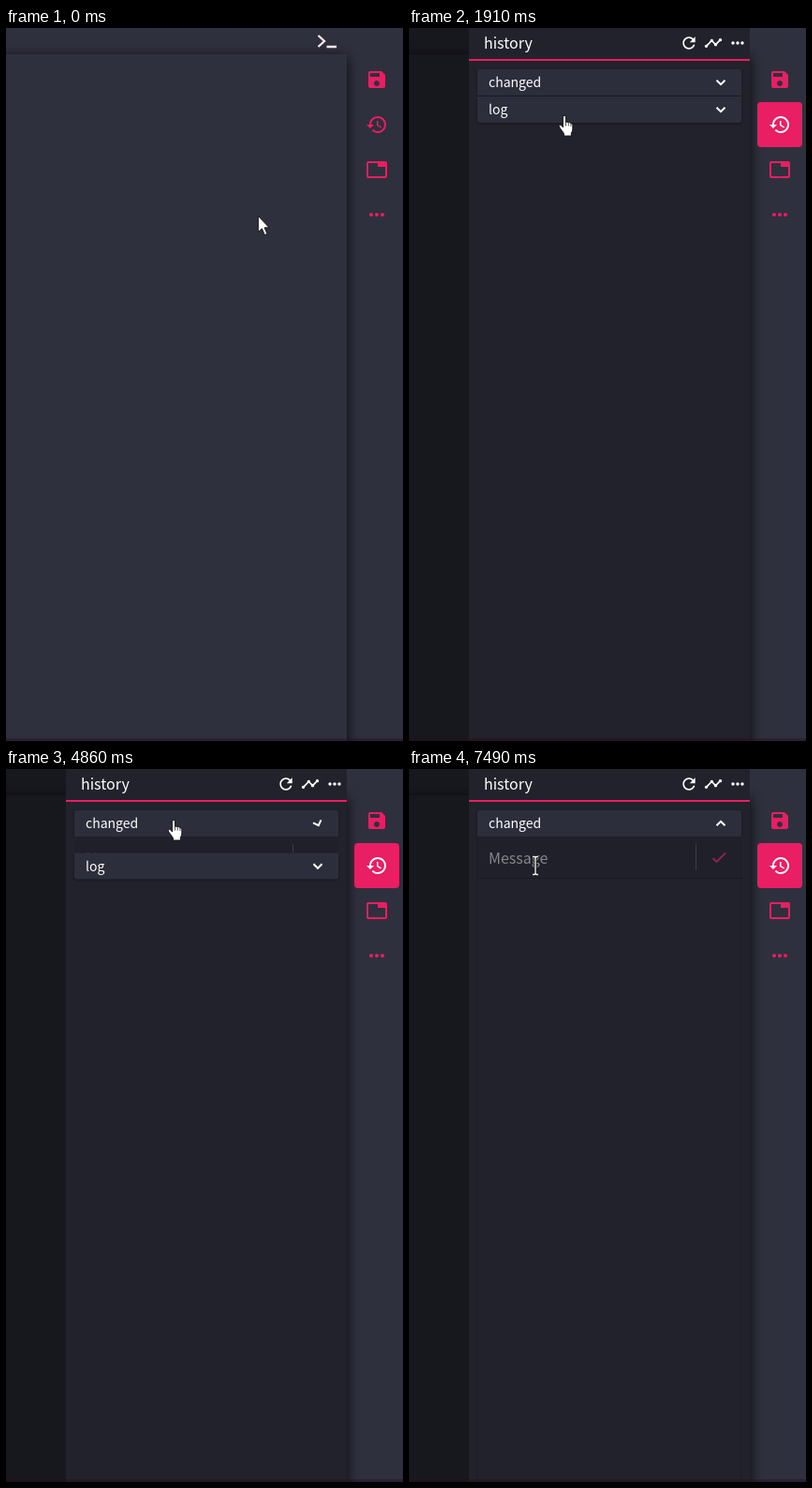
Animation, 424 px wide and 760 px high, one loop 8 s. Source, as an HTML page:

```html
<!DOCTYPE html>
<html lang="en">
<head>
<meta charset="utf-8">
<title>History panel</title>
<style>
html, body { margin: 0; width: 100%; height: 100%; overflow: hidden; background: #2f303d; }
svg { display: block; width: 424px; height: 760px; }
text { font: 500 16px "Noto Sans CJK KR", "Noto Sans CJK JP", "Noto Sans CJK SC", "Noto Sans CJK", "Noto Sans", sans-serif; fill: #fff; }
.row { font-size: 14px; }
.small { font-size: 12px; }
.thin { font-weight: 400; }
.chevron, .line { fill: none; stroke: #fff; stroke-width: 2; }
</style>
</head>
<body>
<svg viewBox="0 0 424 760">
  <defs>
    <filter id="blur" x="-20%" y="-20%" width="140%" height="140%"><feGaussianBlur stdDeviation="7"/></filter>
    <filter id="soft" x="-20%" y="-20%" width="140%" height="140%"><feGaussianBlur stdDeviation="1.5"/></filter>
    <clipPath id="changedClip"><rect id="changedMask" x="73" y="72" width="282" height="0"/></clipPath>
    <clipPath id="logClip"><rect id="logMask" x="73" y="101" width="282" height="0"/></clipPath>
    <path id="dots" d="M6 10c-1.1 0-2 .9-2 2s.9 2 2 2 2-.9 2-2-.9-2-2-2zm12 0c-1.1 0-2 .9-2 2s.9 2 2 2 2-.9 2-2-.9-2-2-2zm-6 0c-1.1 0-2 .9-2 2s.9 2 2 2 2-.9 2-2-.9-2-2-2z"/>
  </defs>

  <rect width="424" height="760" fill="#2f303d"/>
  <rect x="-40" y="31" width="404" height="780" opacity=".85" filter="url(#blur)"/>

  <g fill="#e91e63">
    <rect id="active" x="372" y="79" width="48" height="48" rx="4"/>
    <path transform="translate(384 43)" d="M17 3H5c-1.11 0-2 .9-2 2v14c0 1.1.89 2 2 2h14c1.1 0 2-.9 2-2V7l-4-4zm-5 16c-1.66 0-3-1.34-3-3s1.34-3 3-3 3 1.34 3 3-1.34 3-3 3zm3-10H5V5h10v4z"/>
    <path id="clock" transform="translate(384 91)" d="M13 3c-4.97 0-9 4.03-9 9H1l3.89 3.89.07.14L9 12H6c0-3.87 3.13-7 7-7s7 3.13 7 7-3.13 7-7 7c-1.93 0-3.68-.79-4.94-2.06l-1.42 1.42C8.27 19.99 10.51 21 13 21c4.97 0 9-4.03 9-9s-4.03-9-9-9zm-1 5v5l4.28 2.54.72-1.21-3.5-2.08V8H12z"/>
    <path transform="translate(384 139)" d="M21 3H3c-1.1 0-2 .9-2 2v14c0 1.1.9 2 2 2h18c1.1 0 2-.9 2-2V5c0-1.1-.9-2-2-2zm0 16H3V5h10v4h8v10z"/>
    <use href="#dots" x="384" y="187"/>
  </g>

  <rect y="28" width="364" height="732" fill="#2f303d"/>
  <path class="line" style="stroke:#fde6ee;stroke-width:2.3" d="M333.5 8l6.5 6-6.5 6M342.5 20H353"/>
  <rect id="shade" width="364" height="760"/>

  <g id="drawer">
    <rect x="64" width="300" height="760" fill="#22222c"/>
    <rect x="64" y="33" width="300" height="2" fill="#e91e63"/>
    <text x="80" y="22">history</text>
    <g fill="#fff">
      <path transform="translate(289 6) scale(.833)" d="M17.65 6.35C16.2 4.9 14.21 4 12 4c-4.42 0-7.99 3.58-7.99 8s3.57 8 7.99 8c3.73 0 6.84-2.55 7.73-6h-2.08c-.82 2.33-3.04 4-5.65 4-3.31 0-6-2.69-6-6s2.69-6 6-6c1.66 0 3.14.69 4.22 1.78L13 11h7V4l-2.35 2.35z"/>
      <path transform="translate(315 6) scale(.833)" d="M23 8c0 1.1-.9 2-2 2-.18 0-.35-.02-.51-.07l-3.56 3.55c.05.16.07.34.07.52 0 1.1-.9 2-2 2s-2-.9-2-2c0-.18.02-.36.07-.52l-2.55-2.55c-.16.05-.34.07-.52.07s-.36-.02-.52-.07l-4.55 4.56c.05.16.07.33.07.51 0 1.1-.9 2-2 2s-2-.9-2-2 .9-2 2-2c.18 0 .35.02.51.07l4.56-4.55C8.02 9.36 8 9.18 8 9c0-1.1.9-2 2-2s2 .9 2 2c0 .18-.02.36-.07.52l2.55 2.55c.16-.05.34-.07.52-.07s.36.02.52.07l3.55-3.56C19.02 8.35 19 8.18 19 8c0-1.1.9-2 2-2s2 .9 2 2z"/>
      <use href="#dots" transform="translate(341 6) scale(.833)"/>
    </g>

    <path id="sides" d="M73 72V760M355 72V760" stroke="#1d1d26"/>
    <rect x="73" y="45" width="282" height="28" rx="3" filter="url(#soft)" opacity=".4"/>
    <path d="M73 72V47q0-3 3-3H352q3 0 3 3V72z" fill="#2d2e3b"/>
    <text class="row" x="85" y="63">changed</text>
    <path class="chevron" id="changedArrow" d="M-4.5-2.3L0 2.2 4.5-2.3"/>

    <g clip-path="url(#changedClip)">
      <rect x="73" y="72" width="282" height="44" fill="#20202a"/>
      <path d="M73 116.5H355" stroke="#191921"/>
      <text class="thin" x="85" y="101" style="fill:#86868c">Message</text>
      <path d="M306.5 80V108" stroke="#3d3d46"/>
      <path class="line" style="stroke:#8d2550;stroke-width:1.8" d="M324.5 95l4 4 9.5-9.5"/>
      <path id="caret" d="M85.5 82V106" stroke="#e91e63"/>
    </g>

    <g id="log">
      <rect x="73" y="74" width="282" height="28" rx="3" filter="url(#soft)" opacity=".4"/>
      <path d="M73 73H355V98q0 3-3 3H76q-3 0-3-3z" fill="#2d2e3b"/>
      <text class="row" x="85" y="92">log</text>
      <path class="chevron" id="logArrow" d="M-4.5-2.3L0 2.2 4.5-2.3"/>
      <g clip-path="url(#logClip)">
        <text class="small thin" x="89" y="122" style="fill:#a8a8ad">Branch</text>
        <text x="89" y="147">example</text>
        <path d="M322 139h10l-5 5z" fill="#fff"/>
        <path d="M89 156.5H339" stroke="#c4c4c7"/>
        <text class="small" x="89" y="188">initialize</text>
        <text class="small" x="89" y="207">vqt2816</text>
        <text class="small" x="339" y="207" text-anchor="end">01 Jun 21 03:41</text>
      </g>
    </g>
  </g>

  <rect y="757" width="424" height="3" fill="#2a0a1c" opacity=".4"/>

  <g id="cursor" fill="#fff" stroke="#111" stroke-width=".9" stroke-linejoin="round">
    <path id="arrow" d="M.4.4V17.4L4.3 13.8 7.3 20.6 10 19.4 7 12.8H12z"/>
    <g id="hand" transform="translate(-6.5 0)">
      <path d="M5 2Q5 .4 6.5.4T8 2V7.5Q9.7 6.4 10.8 8 12.4 7 13.4 8.8 15.3 8.2 15.3 10.5V15Q15.3 17 13.8 19V22H6V19.5L2 14Q0 11.6 1 10.6 2.2 9.8 3.6 11.2L5 13z"/>
      <path d="M8 7.5V11.5M10.8 8.5V11.5M13.4 9V12" fill="none" stroke-width=".7"/>
    </g>
    <g id="beam" fill="none">
      <path d="M-3-9.5H-1L0-8.5 1-9.5H3M0-8.5V8.5M-3 9.5H-1L0 8.5 1 9.5H3" stroke-width="3"/>
      <path d="M-3-9.5H-1L0-8.5 1-9.5H3M0-8.5V8.5M-3 9.5H-1L0 8.5 1 9.5H3" stroke="#fff" stroke-width="1.3"/>
    </g>
  </g>
</svg>
<script>
const LOOP = 8000, PANEL_MS = 225, BODY = 154;
const $ = id => document.getElementById(id);
const set = (id, name, value) => $(id).setAttribute(name, value);
const show = (id, on) => set(id, 'visibility', on ? 'inherit' : 'hidden');
const clamp = v => Math.min(1, Math.max(0, v));
const span = (t, start, length) => clamp((t - start) / length);

function bezier(x1, y1, x2, y2) {
  const at = (s, a, b) => 3 * (1 - s) ** 2 * s * a + 3 * (1 - s) * s * s * b + s ** 3;
  return x => {
    let lo = 0, hi = 1;
    for (let i = 0; i < 24; i++) {
      const mid = (lo + hi) / 2;
      if (at(mid, x1, x2) < x) lo = mid; else hi = mid;
    }
    return x <= 0 ? 0 : x >= 1 ? 1 : at(lo, y1, y2);
  };
}
const standard = bezier(.4, 0, .2, 1);
const slide = bezier(.25, .8, .25, 1);
const glide = bezier(.35, .1, .6, 1);

// Each entry toggles the panel, starting from closed.
const changedToggles = [3400, 4720, 6400];
const logToggles = [2110, 3400, 5290, 6400];

function openness(t, toggles) {
  const past = toggles.filter(start => start <= t);
  if (!past.length) return 0;
  const p = standard(span(t, past[past.length - 1], PANEL_MS));
  return past.length % 2 ? p : 1 - p;
}

// time, x, y
const track = [
  [40, 269, 200], [560, 395, 95], [760, 395, 95], [940, 392, 100], [1000, 392, 100],
  [1500, 166, 102], [1550, 166, 101], [1710, 166, 94], [1860, 166, 94], [1910, 166, 93],
  [2620, 166, 93], [2950, 171, 72], [3230, 178.5, 44], [3400, 178.5, 54], [4960, 178.5, 54],
  [5220, 172.5, 80], [5940, 172.5, 80], [6270, 176, 58], [6560, 176, 58], [6760, 175, 72],
  [6920, 175, 72], [7200, 135, 103]
];

function pointer(t) {
  const i = track.findIndex(k => k[0] > t);
  if (i === 0) return track[0].slice(1);
  if (i < 0) return track[track.length - 1].slice(1);
  const [a, b] = [track[i - 1], track[i]];
  const p = glide(span(t, a[0], b[0] - a[0]));
  return [a[1] + (b[1] - a[1]) * p, a[2] + (b[2] - a[2]) * p];
}

function cursorKind(t, x, y) {
  if (t < 868) return x > 372 && y < 127 ? 'hand' : 'arrow';
  if (t < 1500) return 'arrow';
  if (t > 6920 && y > 73) return 'beam';
  return y < 101 ? 'hand' : 'arrow';
}

function draw(t) {
  const active = span(t, 760, 100);
  set('active', 'opacity', active);
  set('clock', 'fill', active > .5 ? '#fff' : '#e91e63');
  set('shade', 'opacity', .5 * span(t, 900, 550));
  show('drawer', t >= 868);
  set('drawer', 'transform', `translate(${300 * (1 - slide(span(t, 868, 400)))} 0)`);

  const a = openness(t, changedToggles), b = openness(t, logToggles);
  const closing = t >= changedToggles[1] && t < changedToggles[2];
  set('changedMask', 'height', a * BODY + (a > 0 ? 1 : 0));
  set('logMask', 'height', b * BODY);
  set('log', 'transform', `translate(0 ${a * BODY})`);
  show('log', closing || a < .85);
  set('changedArrow', 'transform', `translate(333 58) rotate(${-180 * a})`);
  set('logArrow', 'transform', `translate(333 87) rotate(${-180 * b})`);
  set('sides', 'opacity', Math.max(a, b) > .95 ? .8 : 0);
  show('caret', t >= 7100 && t < 7490);

  const [x, y] = pointer(t), kind = cursorKind(t, x, y);
  set('cursor', 'transform', `translate(${Math.round(x)} ${Math.round(y)})`);
  for (const id of ['arrow', 'hand', 'beam']) show(id, id === kind);
}

let begin;
function tick(now) {
  begin ??= now;
  draw((now - begin) % LOOP);
  requestAnimationFrame(tick);
}
draw(0);
requestAnimationFrame(tick);
</script>
</body>
</html>
```
